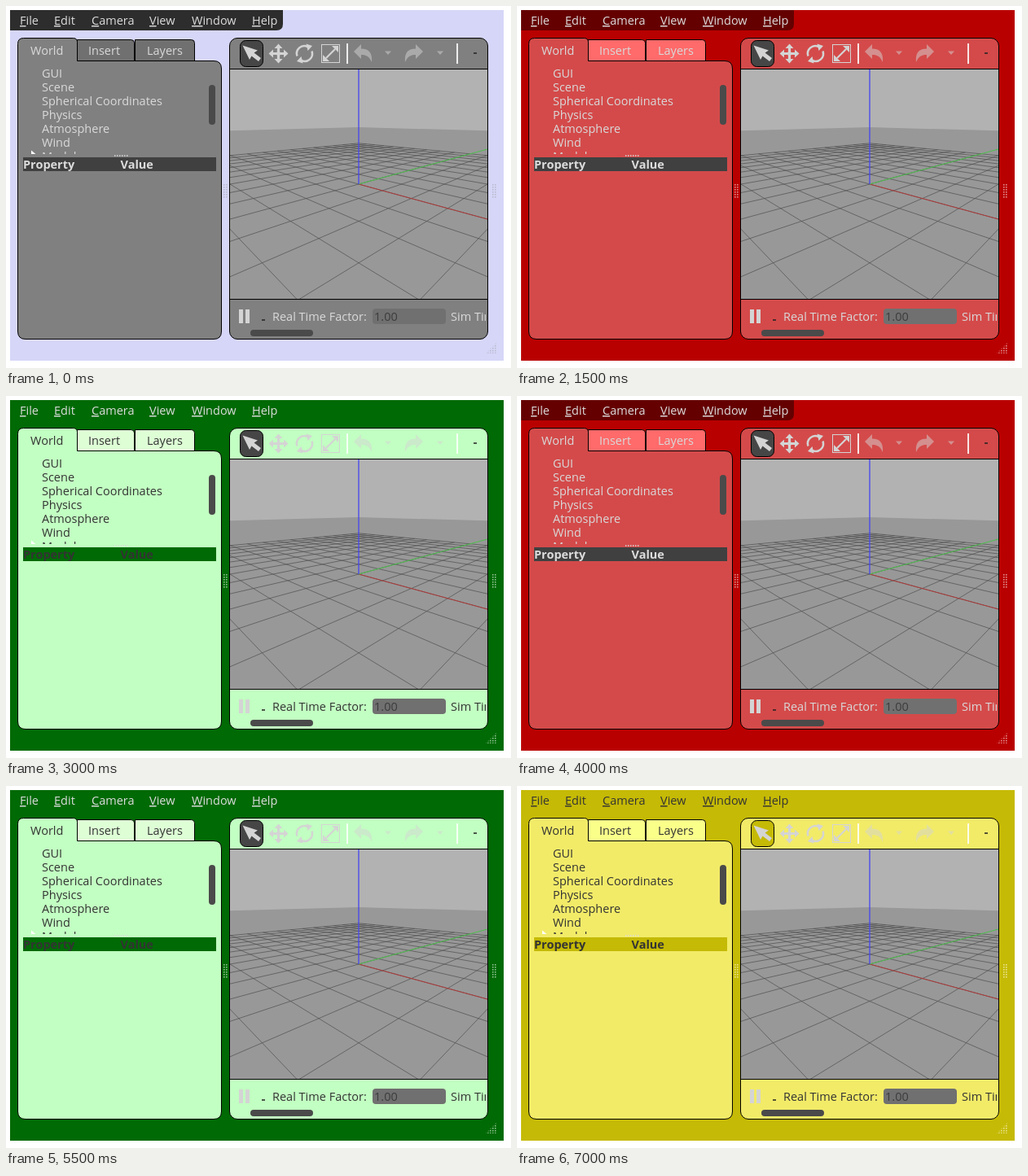
An HTML page that plays this animation: 620 px wide and 445 px high, repeating every 7.5 s.

```html
<!DOCTYPE html>
<html lang="en">
<head>
<meta charset="utf-8">
<title>Theme switcher</title>
<style>
html, body { margin: 0; width: 100%; height: 100%; overflow: hidden; background: #fff; }
svg {
  display: block; width: 620px; height: 445px;
  font: 14.5px "Open Sans", "Noto Sans", sans-serif;
  animation: themes 2.5s step-end infinite;
}

/* Five themes, half a second each, with hard cuts. */
@keyframes themes {
  0%, 100% {
    --window: #d6d6f8; --menu: #2d2d2d; --menu-text: #dcdcdc;
    --panel: #808080; --tab: #707070; --text: #d9d9d9;
    --head: #404040; --head-text: #dcdcdc; --tool: #464646;
    --field: #707070; --field-text: #3c3c3c; --arrow: #fff; --dot: #b9b9cf;
  }
  20% {
    --window: #006a05; --menu: #006a05; --menu-text: #dcdcdc;
    --panel: #c2ffc2; --tab: #deffd6; --text: #333;
    --head: #006a05; --head-text: #333; --tool: #464646;
    --field: #707070; --field-text: #3c3c3c; --arrow: #fff; --dot: #8fc08f;
  }
  40% {
    --window: #ff762a; --menu: #ff762a; --menu-text: #333;
    --panel: #ffbe6b; --tab: #ffe95e; --text: #333;
    --head: #ff762a; --head-text: #333; --tool: #ff762a;
    --field: #ffd6c2; --field-text: #333; --arrow: transparent; --dot: #ffc49c;
  }
  60% {
    --window: #b90000; --menu: #650000; --menu-text: #dcdcdc;
    --panel: #d44a4a; --tab: #ff6a6a; --text: #d9d9d9;
    --head: #404040; --head-text: #dcdcdc; --tool: #464646;
    --field: #707070; --field-text: #3c3c3c; --arrow: transparent; --dot: #e08c8c;
  }
  80% {
    --window: #c5ba06; --menu: #c5ba06; --menu-text: #333;
    --panel: #f2eb68; --tab: #faff8a; --text: #333;
    --head: #c5ba06; --head-text: #333; --tool: #c5ba06;
    --field: #707070; --field-text: #3c3c3c; --arrow: #fff; --dot: #e9e38e;
  }
}

.window { fill: var(--window); }
.menu { fill: var(--menu); }
.menu-text { fill: var(--menu-text); }
.menu-text tspan { text-decoration: underline; }
.panel { fill: var(--panel); }
.tab { fill: var(--tab); }
.edge { stroke: #000; }
.text { fill: var(--text); }
.head { fill: var(--head); }
.head-text { fill: var(--head-text); font-weight: bold; }
.tool { fill: var(--tool); }
.field { fill: var(--field); }
.field-text { fill: var(--field-text); }
.arrow { fill: var(--arrow); }
.dot { fill: var(--dot); }
.bar { fill: #4a4a4a; }
.icon { fill: #d4d4d4; }
.line { fill: none; stroke: #d4d4d4; }
.off { opacity: .5; }
.grid path { fill: none; }
</style>
</head>
<body>
<svg viewBox="0 0 620 445">
  <defs>
    <pattern id="dots" width="3" height="3" patternUnits="userSpaceOnUse">
      <rect class="dot" width="1.6" height="1.6"/>
    </pattern>
    <clipPath id="list"><path d="M15 70H248V182H15z"/></clipPath>
    <clipPath id="view"><path d="M275 78H591V360H275z"/></clipPath>
    <clipPath id="status"><path d="M275 361H589V396H275z"/></clipPath>
    <path id="undo" d="M427 56L436 47V52.5C446 52.5 450 58 449 69C446 62.500 443 60 436 60V65z"/>
    <path id="drop" d="M465 55.500H473L469 60z"/>
    <path id="tip" d="M0 -12L5 -6.500H1.600V0H-1.600V-6.500H-5z"/>
    <path id="turn" d="M-9 3A9.300 9.300 0 0 1 4 -8.400"/>
  </defs>

  <rect class="window" x="5" y="5" width="606" height="431"/>
  <path class="menu" d="M5 5H340V22Q340 30 332 30H5z"/>
  <g class="menu-text">
    <text x="17" y="23"><tspan>F</tspan>ile</text>
    <text x="59" y="23"><tspan>E</tspan>dit</text>
    <text x="105" y="23"><tspan>C</tspan>amera</text>
    <text x="176" y="23"><tspan>V</tspan>iew</text>
    <text x="228" y="23"><tspan>W</tspan>indow</text>
    <text x="302" y="23"><tspan>H</tspan>elp</text>
  </g>

  <!-- Left panel -->
  <g class="edge">
    <path class="tab" d="M87.500 67.500V41.500H153.500Q157.500 41.500 157.500 45.500V67.500z"/>
    <path class="tab" d="M158.500 67.500V41.500H227.500Q231.500 41.500 231.500 45.500V67.500z"/>
    <path class="panel" d="M14.500 46.500Q14.500 39.500 21.500 39.500H82.500Q87.500 39.500 87.500 44.500V67.500H255Q264.500 67.500 264.500 77V400Q264.500 409.500 255 409.500H24Q14.500 409.500 14.500 400z"/>
  </g>
  <g class="text">
    <text x="30" y="60">World</text>
    <text x="101" y="60">Insert</text>
    <text x="173" y="60">Layers</text>
    <g clip-path="url(#list)">
      <text x="44" y="88">GUI</text>
      <text x="44" y="105">Scene</text>
      <text x="44" y="122">Spherical Coordinates</text>
      <text x="44" y="139">Physics</text>
      <text x="44" y="156">Atmosphere</text>
      <text x="44" y="173">Wind</text>
      <text x="44" y="190">Models</text>
      <path class="arrow" d="M31 177.500L37 182.500L31 187.500z"/>
    </g>
  </g>
  <path d="M133 184H151" stroke="#ddd" stroke-width="1.500" stroke-dasharray="1.500 1.500"/>
  <rect class="head" x="21" y="186" width="237" height="17"/>
  <g class="head-text">
    <text x="21" y="200">Property</text>
    <text x="140.500" y="200">Value</text>
  </g>
  <rect class="bar" x="249" y="97" width="8" height="49" rx="4"/>

  <!-- Right panel -->
  <rect class="panel edge" x="274.500" y="39.500" width="317" height="370" rx="9.500"/>
  <rect class="tool edge" x="287.500" y="42.500" width="28" height="32" rx="7"/>
  <path class="icon" d="M290.500 48.500L309 54.500L304.500 57.500L313 64L310 68L301.500 61.500L299 66z"/>
  <g class="icon" transform="translate(334.500 58.500)">
    <use href="#tip"/>
    <use href="#tip" transform="rotate(90)"/>
    <use href="#tip" transform="rotate(180)"/>
    <use href="#tip" transform="rotate(270)"/>
    <path d="M-2 -2H2V2H-2z"/>
  </g>
  <g transform="translate(366.500 58.500)">
    <g class="line" stroke-width="2.500">
      <use href="#turn"/>
      <use href="#turn" transform="rotate(180)"/>
    </g>
    <path class="icon" d="M2 -12L9.500 -9.500L4 -3.500zM-2 12L-9.500 9.500L-4 3.500z"/>
  </g>
  <rect class="line" x="387.500" y="47.500" width="22" height="22"/>
  <path class="line" d="M393 64L404 53" stroke-width="2.200"/>
  <path class="icon" d="M400 49H408V57zM389 60V68H397z"/>
  <path d="M419 46V71M554 46V71" stroke="#fff" stroke-width="1.700"/>
  <g class="icon off">
    <use href="#undo"/>
    <use href="#drop"/>
    <use href="#undo" transform="matrix(-1 0 0 1 939 0)"/>
    <use href="#drop" x="64"/>
  </g>
  <path d="M574 58H578M314 386H318" stroke="#222" stroke-width="1.500"/>

  <!-- 3D view -->
  <g class="grid" clip-path="url(#view)">
    <rect x="275" y="78" width="316" height="282" fill="#b2b2b2"/>
    <path d="M275 153.300L433 149.100L591 153.300V360H275z" style="fill:#989898"/>
    <path id="cells" stroke="#4c4c4c" stroke-width=".8" stroke-opacity=".85"/>
    <path id="axis-x" stroke="#b03a3a"/>
    <path id="axis-y" stroke="#4cc04c"/>
    <path d="M433 219V78" stroke="#4646f0" stroke-width="1.300"/>
  </g>
  <path class="edge" d="M275 77.500H591M275 360.500H591"/>

  <!-- Status bar -->
  <path class="icon" d="M286 373H291V390H286zM294 373H299V390H294z"/>
  <g class="text" clip-path="url(#status)">
    <text x="327" y="387">Real Time Factor:</text>
    <text x="546" y="387">Sim Time:</text>
  </g>
  <rect class="field" x="450" y="372" width="90" height="19" rx="4"/>
  <text class="field-text" x="452" y="387">1.00</text>
  <rect class="bar" x="300" y="398" width="77" height="8" rx="4"/>

  <!-- Splitter and resize grips -->
  <path fill="url(#dots)" d="M267 219H272V237H267zM597 219H602V237H597zM589 427L602 414V427z"/>
</svg>
<script>
const FOCAL = 158 / Math.tan(Math.PI / 6);
const HEIGHT = 2, DISTANCE = 5 * Math.SQRT2;
const PITCH = Math.atan2(HEIGHT, DISTANCE);
const NEAR = 0.2;

// Camera at (5, -5, 2), aimed at the ground origin.
function toCamera([x, y]) {
  const right = (x + y) / Math.SQRT2;
  const ahead = DISTANCE + (y - x) / Math.SQRT2;
  return [
    right,
    HEIGHT * Math.cos(PITCH) - ahead * Math.sin(PITCH),
    ahead * Math.cos(PITCH) + HEIGHT * Math.sin(PITCH)
  ];
}

function clipNear(a, b) {
  if (a[2] >= NEAR) return a;
  const k = (NEAR - a[2]) / (b[2] - a[2]);
  return a.map((v, i) => v + (b[i] - v) * k);
}

function project([right, down, depth]) {
  const x = 433 + right / depth * FOCAL;
  const y = 219 + down / depth * FOCAL;
  return x.toFixed(2) + " " + y.toFixed(2);
}

function segment(from, to) {
  const a = toCamera(from), b = toCamera(to);
  if (a[2] < NEAR && b[2] < NEAR) return "";
  return "M" + project(clipNear(a, b)) + "L" + project(clipNear(b, a));
}

function draw(id, d) {
  document.getElementById(id).setAttribute("d", d);
}

let cells = "";
for (let i = -10; i <= 10; i++) {
  cells += segment([i, -10], [i, 10]) + segment([-10, i], [10, i]);
}
draw("cells", cells);
draw("axis-x", segment([0, 0], [20, 0]));
draw("axis-y", segment([0, 0], [0, 20]));
</script>
</body>
</html>
```
